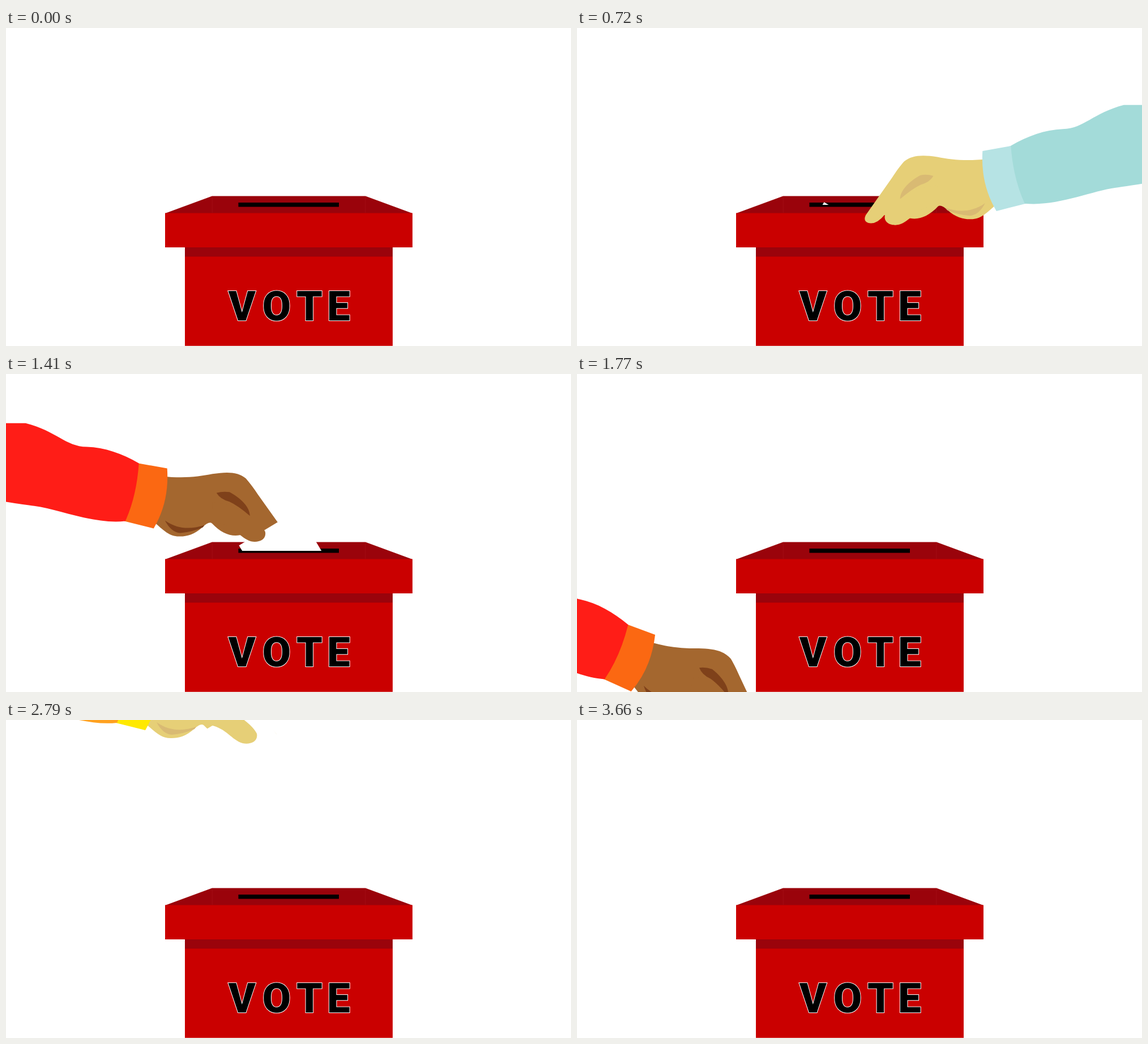
An HTML page that plays this animation: 998x561 px, repeating every 3960 ms.

```html
<!DOCTYPE html>
<html lang="en">
<head>
<meta charset="utf-8">
<title>Vote</title>
<style>
  html, body { margin: 0; width: 100%; height: 100%; overflow: hidden; background: #fff; }
  svg { display: block; width: 998px; height: 561px; }
  text { font: 900 73px Roboto, sans-serif; text-anchor: middle; paint-order: stroke; stroke: #fff; stroke-width: 2px; }
</style>
</head>
<body>
<svg viewBox="0 0 998 561">
  <defs>
    <clipPath id="aboveSlot"><rect x="0" y="-400" width="998" height="712"/></clipPath>
  </defs>
  <path fill="#9a030b" d="M364 296.500H635L718 327H281Z"/>
  <path stroke="#a9141a" stroke-width=".7" d="M364.200 297V326M634.800 297V326"/>
  <rect x="410.500" y="308" width="177.500" height="7.500"/>
  <path fill="#ca0000" d="M281 326.500H718V387H683V560.700H316V387H281Z"/>
  <rect x="316" y="387" width="367" height="16.300" fill="#9a030b"/>
  <text x="417 478 536 587.500" y="515.500">VOTE</text>
  <g id="hands"></g>
</svg>
<script>
const LOOP = 3960, STEP = 30, FIRST = 150, GAP = 870, STAY = 900;

const voters = [
  { sleeve: '#a3dbd9', cuff: '#b6e3e4', skin: '#e6cf77', shade: '#d9ba73', left: false },
  { sleeve: '#ff1d17', cuff: '#fb6812', skin: '#a4672f', shade: '#7f411a', left: true },
  { sleeve: '#42ab56', cuff: '#5fba63', skin: '#d9ba73', shade: '#a4672f', left: false },
  { sleeve: '#ffa11f', cuff: '#ffe900', skin: '#e6cf77', shade: '#d9ba73', left: true }
];

// time, cuff x, cuff y, turn in degrees
const handKeys = [
  [0, 721, -114, 0], [30, 717, -88, 0], [270, 680, 91, 0], [420, 708, 181, 0],
  [600, 726, 237, -1], [750, 849, 460, -10.200], [840, 868, 517, -17], [900, 880, 640, -22]
];
// time, x and y of the ballot's upper left corner
const paperKeys = [
  [0, 550, -62], [30, 546, -36], [270, 509, 143], [420, 464, 261],
  [510, 447, 290], [620, 431, 316], [900, 431, 316]
];

// The arm is drawn with its cuff corner at (680, 91).
const PIVOT = [680, 91];
const shapes = {
  palm: 'M690 105C650 109 625 106 600 101C575 97 555 97 541 109C533 118 526 128 520 137' +
    'L473 203Q468 214 478 217Q492 220 506 203L552 209C568 212 585 205 601 188' +
    'C605 185 611 189 617 194C632 208 645 211 657 211C675 212 685 202 705 184Z',
  crease: 'M534 175C534 158 553 142 570 133Q582 131 593 134.500Q586 146 570 150Q555 157 534 175Z',
  heel: 'M614 191C635 198 660 200 684 183Q673 204 657 205Q635 203 617 195Z',
  thumb: 'M549 165C530 178 513 190 507 203C504 217 519 223 532 220C552 214 560 194 589 188' +
    'L602 187L600 150L560 158Z',
  cuff: 'M680 91L731 82L756 184L704 197Q676 150 680 91Z',
  sleeve: 'M730 82C760 65 790 54 822 53C860 52 875 25 930 11H996V144' +
    'C960 151 930 155 915 157C870 163 810 190 754 184Q734 140 730 82Z'
};

function make(tag, parent, attrs) {
  const node = document.createElementNS('http://www.w3.org/2000/svg', tag);
  for (const name in attrs) node.setAttribute(name, attrs[name]);
  return parent.appendChild(node);
}

function buildVoter(look) {
  const root = make('g', document.getElementById('hands'),
    look.left ? { transform: 'translate(987 0) scale(-1 1)' } : {});
  const draw = (parent, part, fill) => make('path', parent, { d: shapes[part], fill });
  const back = make('g', root);
  draw(back, 'palm', look.skin);
  draw(back, 'crease', look.shade);
  draw(back, 'heel', look.shade);
  const slot = make('g', root, { 'clip-path': 'url(#aboveSlot)' });
  const paper = make('rect', slot, { width: 120, height: 176, fill: '#fff' });
  const front = make('g', root);
  draw(front, 'thumb', look.skin);
  draw(front, 'cuff', look.cuff);
  draw(front, 'sleeve', look.sleeve);
  return { root, back, paper, front };
}

// Smooth path through the keys
function sample(keys, t) {
  let i = 0;
  while (i < keys.length - 2 && t >= keys[i + 1][0]) i++;
  const a = keys[i], b = keys[i + 1];
  const before = keys[Math.max(i - 1, 0)], after = keys[Math.min(i + 2, keys.length - 1)];
  const span = b[0] - a[0], u = (t - a[0]) / span, v = 1 - u;
  return a.slice(1).map((p, n) => {
    const k = n + 1, q = b[k];
    const m0 = (q - before[k]) / (b[0] - before[0]) * span;
    const m1 = (after[k] - p) / (after[0] - a[0]) * span;
    return v * v * (1 + 2 * u) * p + u * v * v * m0 + u * u * (3 - 2 * u) * q - u * u * v * m1;
  });
}

const actors = voters.map(buildVoter);

function render(ms) {
  const now = Math.floor((ms % LOOP) / STEP) * STEP;
  actors.forEach(({ root, back, paper, front }, i) => {
    const t = now - FIRST - i * GAP;
    const shown = t >= 0 && t < STAY;
    root.setAttribute('display', shown ? 'inline' : 'none');
    if (!shown) return;
    const [x, y, turn] = sample(handKeys, t);
    const [px, py] = sample(paperKeys, t);
    const pose = `translate(${x} ${y}) rotate(${turn}) translate(${-PIVOT[0]} ${-PIVOT[1]})`;
    back.setAttribute('transform', pose);
    front.setAttribute('transform', pose);
    paper.setAttribute('transform', `translate(${px} ${py}) rotate(31)`);
  });
}

const start = performance.now();
function tick() {
  render(performance.now() - start);
  requestAnimationFrame(tick);
}
tick();
</script>
</body>
</html>
```
